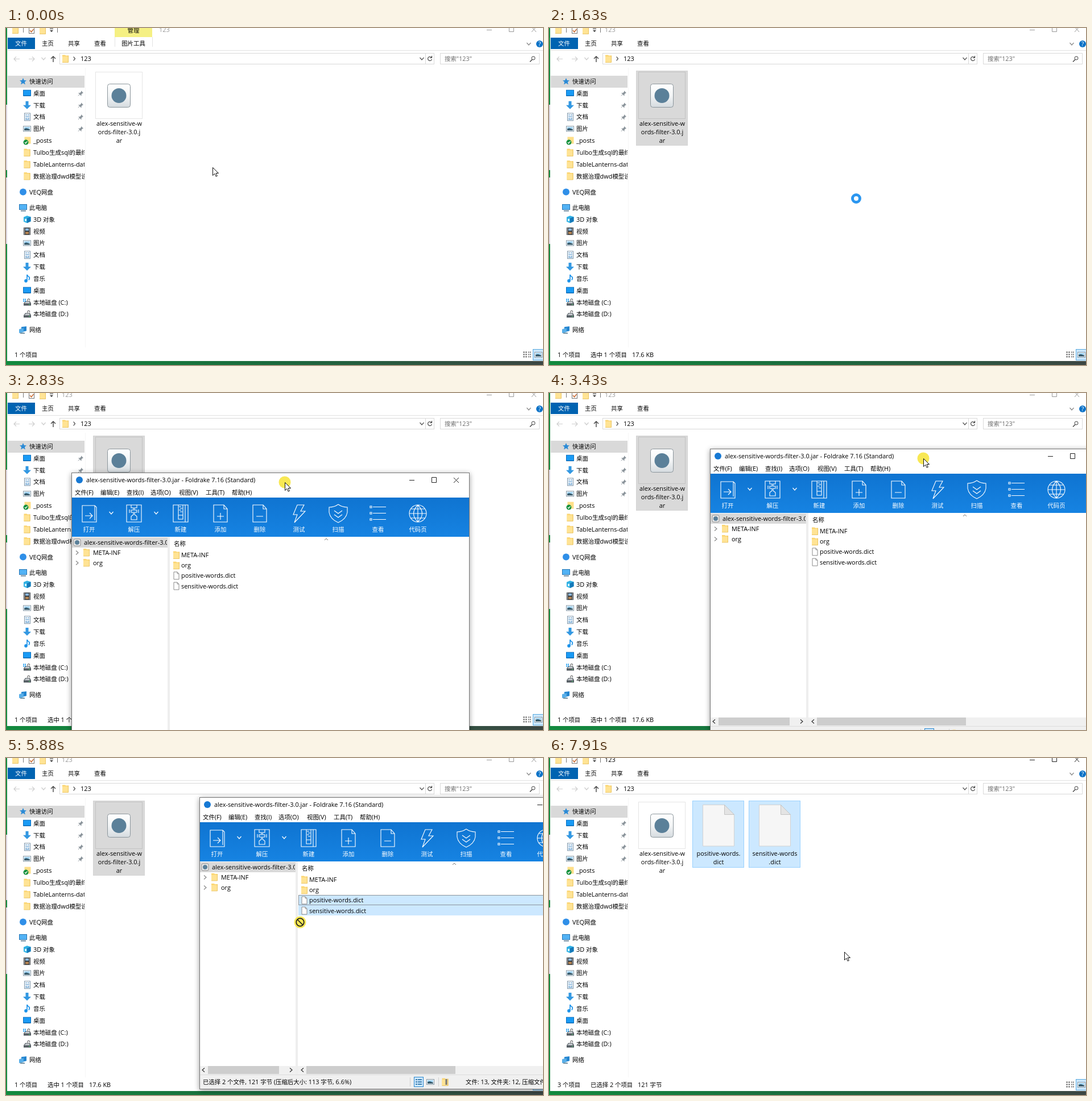
Write an HTML page that moves like this. It is 944 px wide and 593 px high and loops after 8000 ms.

```html
<!DOCTYPE html>
<html lang="zh-CN">
<head>
<meta charset="utf-8">
<title>123</title>
<style>
  html, body { margin: 0; width: 100%; height: 100%; overflow: hidden; background: #fff; }
  svg { display: block; width: 944px; height: 593px; }
  text { font: 10.9px "Open Sans", "Noto Sans CJK SC", "Noto Sans CJK", sans-serif; white-space: pre; }
  tspan { font-size: 10.4px; }
  .mid { text-anchor: middle; }
  .row > rect { fill: none; }
  .row.on > rect { fill: #0a8ceb; }
  .row.on > text { fill: #fff; }
  #caption { fill: #999; stroke: #999; }
  #caption.active { fill: #000; stroke: #222; }
  #caption text { stroke: none; }
  #archive { filter: drop-shadow(0 2px 5px #0006); }
</style>
</head>
<body>
<svg id="stage" viewBox="0 0 944 593"></svg>
<script>
const LOOP = 8000;
const BLUE = '#1a8ae2';

// Drawing helpers
const text = (x, y, s, attr = '') =>
  `<text x="${x}" y="${y + 4}" ${attr}>${s.replace(/[\u3000-\u9fff]+/g, '<tspan>$&</tspan>')}</text>`;
const rect = (x, y, w, h, fill, attr = '') =>
  `<rect x="${x}" y="${y}" width="${w}" height="${h}" fill="${fill}" ${attr}/>`;
const box = (x, y, w, h, fill, stroke, attr = '') =>
  rect(x + .5, y + .5, w - 1, h - 1, fill, `stroke="${stroke}" ${attr}`);
const line = (d, stroke = '#444', width = 1, fill = 'none') =>
  `<path d="${d}" stroke="${stroke}" stroke-width="${width}" fill="${fill}"/>`;
const shape = (d, fill) => `<path d="${d}" fill="${fill}"/>`;
const dot = (x, y, r, fill) => `<circle cx="${x}" cy="${y}" r="${r}" fill="${fill}"/>`;
const at = (x, y, body) => `<g transform="translate(${x} ${y})">${body}</g>`;
const group = (id, body) => `<g id="${id}">${body}</g>`;
const chevron = (x, y, color = '#555') => line(`M${x - 3.5} ${y - 2}l3.5 4 3.5 -4`, color, 1.2);
const angle = (x, y, dir, color = '#333') => line(`M${x - dir * 2} ${y - 3.5}l${dir * 4} 3.5 ${-dir * 4} 3.5`, color, 1.2);

// Icons, each centred on 0,0
const icons = {
  none: '',
  folder: shape('M-5.5 -6.5h5l1 1h5v12h-11z', '#fbd572') + shape('M-5.5 -4h9l2 1v9.5h-11z', '#ffe394') + line('M5 -5.5v12h-10.5', '#e3b84e', .7),
  file: line('M-4.5 -6.5h6l3 3v10h-9z', '#8a8a8a', 1, '#fff') + line('M1.5 -6.5v3h3', '#8a8a8a'),
  star: shape('M0 -6l1.8 4 4.2 .3-3.2 2.8 1 4.3-3.8-2.3-3.8 2.3 1-4.3-3.2-2.8 4.2-.3z', '#2c8bd6'),
  desktop: box(-7, -6, 14, 11, '#1a9bf5', '#0a6fc0') + rect(-6, 4, 12, 1, '#0d5fa5'),
  down: shape('M-2.5 -7h5v7h4.500l-7 7-7-7h4.500z', '#3398e2'),
  doc: box(-5, -7, 11, 14, '#fff', '#7a93a8') + line('M-3 -3.500h3m1 0h3M-3 -.5h7M-3 2.500h3m1 0h3M-3 4.500h7', '#3d86c4'),
  picture: box(-7, -5, 14, 10, '#fff', '#8296a5') + rect(-5, -3, 10, 3, '#9bd1f2') + shape('M-5 3v-3l4-1 6 2v2z', '#35596b'),
  checked: shape('M-4.500 -6.500h11v12h-11z', '#ffdf88') + dot(-2, 3, 4.500, '#16913d') + line('M-4 3l1.500 1.800 3-3.600', '#fff', 1.3),
  cloud: dot(0, 0, 6, '#2f8fe8'),
  pc: box(-7, -6, 14, 10, '#53b3f5', '#2676b5') + rect(-4, 5, 9, 1.500, '#50748d'),
  cube: shape('M-6 -4l6-2.500 6.500 2v8l-6.500 3-6-2.500z', '#30b1e4') + shape('M0 -2l6.500 -2.500v8l-6.500 3z', '#1679b9') + shape('M-4 -1h3v4h-3z', '#d8f3ff'),
  film: rect(-6, -6.500, 12, 13, '#2d3338') + rect(-3, -5, 6, 4, '#8ebbe0') + rect(-3, 1, 6, 4, '#b88653') + line('M-4.500 -6v12M4.500 -6v12', '#ccc', 1),
  music: dot(-2, 4, 2.800, '#1d93ea') + line('M0 4v-11q1 3 4 4.500 1 2-1 5', '#1d93ea', 1.700),
  disk: shape('M-6 2l3-4h8l2 4v4h-13z', '#555d63') + shape('M-5 2l3-3h6l1 3z', '#c9ced1') + line('M1 -2v-3q2-2 3.500 0v2', '#777', 1.200) + rect(3, 3.500, 2, 1, '#53df72'),
  system: '',
  network: shape('M-3 -5l9-1v8l-9 2z', '#2485cf') + shape('M-7 -1l8-2v7l-8 2z', '#58aee8') + line('M-5 6h8', '#477089', 1.500),
  app: dot(0, 0, 6, '#1779d4'),
  editor: rect(-6, -6, 12, 12, '#a9c55c'),
  guard: dot(0, 0, 6, '#f29b26'),
  share: line('M-1 -4h-5v9h10v-3M-3 2q0-5 6-5v-3l4 4-4 4v-3q-4 0-6 3', '#333'),
  version: rect(-6, -6, 12, 12, '#8495a8'),
  tile: box(-6.500, -6.500, 13, 13, '#eee', '#8b8b8b', 'rx="2"') + dot(0, 0, 4, '#5b8099')
};
icons.system = icons.disk + [-7, -4].map(x => rect(x, -6, 2, 2, '#1899ef') + rect(x, -3, 2, 2, '#1899ef')).join('');
const icon = (name, x, y) => at(x, y, icons[name]);

// File manager
const sidebar = () => {
  const item = (y, name, label, head) =>
    icon(name, head ? 30 : 37, y) + text(head ? 41 : 48, y, label);
  const quick = [['star', '快速访问'], ['desktop', '桌面'], ['down', '下载'], ['doc', '文档'], ['picture', '图片'],
    ['checked', '_posts'], ['folder', 'Tulbo生成sql的最终版'], ['folder', 'TableLanterns-data'], ['folder', '数据治理dwd模型设计']];
  const places = [['pc', '此电脑'], ['cube', '3D 对象'], ['film', '视频'], ['picture', '图片'], ['doc', '文档'],
    ['down', '下载'], ['music', '音乐'], ['desktop', '桌面'], ['system', '本地磁盘 (C:)'], ['disk', '本地磁盘 (D:)']];
  const list = (rows, y) => rows.map(([name, label], i) => item(y + i * 20.82, name, label, !i)).join('');
  const pins = [1, 2, 3, 4].map(i => at(131, 94.500 + i * 20.82,
    shape('M1 -5l4 4-1.500 .5-2 2 0 3-5.500-5.500 3 0 2-2z', '#8b949b') + line('M-1 1l-3 3', '#8b949b'))).join('');
  return rect(3, 84, 135, 21, '#d9d9d9') + `<g clip-path="url(#side)">` + list(quick, 94) + pins +
    item(288.500, 'cloud', 'VEQ网盘', true) + list(places, 316) + item(531, 'network', '网络', true) +
    '</g>' + rect(139, 70, 1, 492, '#f5f5f5');
};

const label = (x, lines) => lines.map((s, i) => text(x, 168 + i * 14.800, s, 'class="mid"')).join('');
const sheet = (x, lines) => box(x, 75, 91, 118, '#cce8ff', '#99d1ff') +
  line(`M${x + 18.500} 82.500h38l17 17v55.500h-55z`, '#d2d2d2', 1, '#f6f6f6') +
  line(`M${x + 56.500} 82.500v17h17z`, '#c4c4c4', 1, '#e4e4e4') + label(x + 46, lines);

const explorer = () =>
  rect(0, 0, 944, 593, '#128a3e') + rect(0, 135, 2, 115, '#d9d4de') + rect(0, 263, 2, 117, '#d9d4de') +
  rect(0, 585, 944, 8, 'url(#desk)') + rect(2, 0, 942, 586, '#fff') +
  icon('folder', 16.500, 3) + line('M30.500 0v8M90.500 0v8', '#777') +
  box(40, -1, 10, 11, '#fff', '#777') + line('M42 4l2.500 3 4-5', '#c96c33', 1.500) + icon('folder', 64.500, 4) +
  line('M77 1.500h6', '#333') + shape('M77 4h6l-3 3z', '#333') +
  group('tools', rect(191, 0, 66, 16, '#f5f083') + line('M191.500 16v17M257.500 16v17', '#e3e3e3') +
    text(224, 4, '管理', 'class="mid"') + text(224, 27, '图片工具', 'class="mid"')) +
  group('caption', text(0, 3, '123', 'id="title"') +
    '<path fill="none" d="M845 3.500h9M884.500 -2.500h8v9h-8zM924 -2l8 9M932 -2l-8 9"/>') +
  rect(3, 17, 48, 20, '#0063b1') + text(16, 27, '文件', 'fill="#fff"') +
  text(63, 27, '主页') + text(109, 27, '共享') + text(155, 27, '查看') + rect(3, 39, 941, 1, '#e1e1e1') +
  chevron(919, 28, '#888') + dot(938, 28, 6, '#0a72c7') + text(938, 28, '?', 'class="mid" fill="#fff" font-weight="bold"') +
  line('M24 54.500h-10m4-4l-4 4 4 4M40 54.500h10m-4-4l4 4-4 4', '#cfcfcf', 1.200) + chevron(66, 54, '#ccc') +
  line('M83 60v-10m-4 4l4-4 4 4', '#444', 1.400) +
  box(94, 44, 659, 20, '#fff', '#d9d9d9') + line('M737.500 45v18', '#d9d9d9') +
  icon('folder', 104.500, 54) + angle(120, 54, .700) + text(131, 54, '123') + chevron(731, 54) +
  line('M748 52a3.500 3.500 0 1 0 .5 3M748.500 49v3.500h-3.500', '#444', 1.200) +
  box(763, 44, 175, 20, '#fff', '#d9d9d9') + text(771, 54, '搜索"123"', 'fill="#6d6d6d"') +
  '<circle cx="927" cy="53" r="3" fill="none" stroke="#444"/>' + line('M925 55.500l-4 4', '#444', 1.500) +
  sidebar() +
  `<rect id="pick" x="153.500" y="75.500" width="90" height="131"/>` +
  box(157, 77, 83, 83, 'none', '#000', 'stroke-opacity=".1"') +
  box(178, 98, 41, 42, 'url(#tile)', '#8c969c', 'rx="4"') + dot(198.500, 119, 13, '#5b8099') +
  label(199, ['alex-sensitive-w', 'ords-filter-3.0.j', 'ar']) +
  group('extracted', sheet(252, ['positive-words.', 'dict']) + sheet(351, ['sensitive-words', '.dict'])) +
  text(15, 575, '', 'id="count"') + text(73, 575, '', 'id="chosen"') + text(146, 575, '', 'id="size"') +
  [570, 574, 578].map(y => line(`M909 ${y + .5}h3m1 0h3m2 0h2m1 0h2`, '#777', 2)).join('') +
  box(926, 565, 20, 20, '#cce8ff', '#58a9de') + icon('picture', 936, 575);

// Context menu: [y, icon, icon x, text x, label, has submenu]
const menuRows = [
  [112, 'none', 0, 234, '打开(O)'], [130, 'none', 0, 234, 'VEQ云文档 - 分享文件'],
  [156, 'app', 224, 234, '解压到当前文件夹(E)'], [174, 'app', 224, 234, '自动解压(S)'],
  [192, 'app', 224, 234, '解压到 alex-sensitive-words-fil...\\(T)'], [210.500, 'app', 224, 234, '选择解压路径...'],
  [239, 'app', 224, 232, '压缩文件预览'], [257, 'folder', 233, 242, 'META-INF'], [275, 'folder', 247, 256, 'maven'],
  [293, 'file', 247, 256, 'MANIFEST.MF'], [312, 'folder', 233, 242, 'org'],
  [330, 'file', 233, 242, 'positive-words.dict'], [348, 'file', 233, 242, 'sensitive-words.dict'],
  [378, 'editor', 224, 234, 'Edit with Notepad++'], [396, 'guard', 224, 234, '使用竹影安全进行杀毒'],
  [414, 'share', 224, 234, '共享'], [433, 'none', 0, 234, '打开方式(H)...'], [458, 'none', 0, 234, '上传到VEQ云文档'],
  [484, 'none', 0, 234, '授予访问权限(G)', true], [510, 'version', 225, 234, 'TortoiseGit(T)', true],
  [536, 'version', 225, 234, 'TortoiseSVN', true], [562.500, 'none', 0, 234, '还原以前的版本(V)'],
  [588, 'none', 0, 234, '发送到(N)', true]
];
const menu = () =>
  rect(217, 104, 236, 500, '#000', 'opacity=".42"') + box(213, 100, 237, 500, '#f2f2f2', '#a0a0a0') +
  [142, 223, 364, 445, 471, 497, 523, 549, 575].map(y => rect(217, y, 229, 1, '#a6a6a6')).join('') +
  menuRows.map(([y, name, ix, x, s, sub], i) =>
    `<g class="row">${rect(216, y - 9, 231, 18, 'none')}${icon(name, ix, y)}` +
    text(x, y, s, i ? '' : 'style="font-weight:bold"') + (sub ? shape(`M437 ${y - 4}l4 3.500-4 3.500z`, '#000') : '') + '</g>').join('');

// Archive window, in its own coordinates
const toolIcons = [
  [31, '打开', 'M-12 -14h22l3 3v26h-25zM10 -14v26M-7 4h13m-5-5l5 5-5 5'],
  [110, '解压', 'M-13 -15h26v30h-26zM-5 -15v5h4v4h-4v4h4v4l-4 3v6h10v-6l-4-3v-4h4v-4h-4v-4h4v-5M-8 -7v6M8 -7v6'],
  [192, '新建', 'M-13 -15h26v30h-26zM-4 -15v18h8v-18M-3 -12h4m-2 3h4m-6 3h4m-2 3h4M-4 3v7h8v-7M8 -15v30'],
  [262, '添加', 'M-12 -15h18l6 7v23h-24zM6 -15v7h6M-6 5h12m-6-6v12'],
  [331, '删除', 'M-12 -15h18l6 7v23h-24zM6 -15v7h6M-6 5h12'],
  [400, '测试', 'M-3 -15h12l-6 11h8l-19 20 5-14h-7z'],
  [469, '扫描', 'M0 -16q7 5 16 5v9q-2 12-16 18q-14-6-16-18v-9q9 0 16-5M-7 -5l7 5 7-5M-7 2l7 5 7-5'],
  [539, '查看', 'M-9 -11.500h23M-9 -.5h23M-9 10.500h23M-14 -13h3v3h-3zM-14 -2h3v3h-3zM-14 9h3v3h-3z'],
  [609, '代码页', 'M-15 0a15 15 0 1 0 30 0a15 15 0 1 0-30 0h30M0 -15v30M0 -15q-15 15 0 30q15-15 0-30M-12 -8h24M-12 8h24']
];
const bars = [['文件(F)', 6], ['编辑(E)', 51], ['查找(I)', 97], ['选项(O)', 139], ['视图(V)', 189], ['工具(T)', 236], ['帮助(H)', 282]];
const archive = () =>
  box(0, 0, 700, 514, '#fff', '#777') + icon('app', 14, 13) +
  text(26, 13, 'alex-sensitive-words-filter-3.0.jar - Foldrake 7.16 (Standard)') +
  line('M594 13.500h9M633.500 8.500h8v9h-8zM672 9l9 9M681 9l-9 9', '#222') +
  bars.map(([s, x]) => text(x, 35, s)).join('') +
  rect(1, 44, 698, 69, 'url(#ribbon)') +
  toolIcons.map(([x, s, d]) => at(x, 72, line(d, '#fff', 1.100)) + text(x, 100, s, 'class="mid" fill="#fff"')).join('') +
  chevron(70, 71, '#fff') + chevron(149, 71, '#fff') +
  rect(1, 114, 168, 18, '#d9d9d9') + icon('tile', 10, 123) +
  `<g clip-path="url(#tree)">${text(22, 123, 'alex-sensitive-words-filter-3.0.jar')}</g>` +
  ['META-INF', 'org'].map((s, i) => angle(10, 141 + i * 18, 1, '#888') + icon('folder', 26.500, 140.500 + i * 18) + text(38, 140.500 + i * 18, s)).join('') +
  rect(169, 113, 4, 375, '#eee') + text(180, 125, '名称') + line('M445 119l3-3 3 3', '#777') +
  `<rect id="rowA" x="174.500" y="172.500" width="525" height="17" fill="#cce8ff"/>` +
  rect(174, 190, 525, 18, '#cce8ff', 'id="rowB"') +
  ['META-INF', 'org', 'positive-words.dict', 'sensitive-words.dict'].map((s, i) =>
    icon(i < 2 ? 'folder' : 'file', 184.500, 145 + i * 18.200) + text(193, 145 + i * 18.200, s)).join('') +
  rect(1, 473, 168, 15, '#f0f0f0') + rect(15, 473, 125, 14, '#cdcdcd') + angle(7, 480, -1) + angle(161, 480, 1) +
  rect(173, 473, 526, 15, '#f0f0f0') + rect(188, 473, 262, 14, '#cdcdcd') + angle(181, 480, -1) +
  rect(1, 488, 698, 25, '#f0f0f0') + rect(1, 488, 698, 1, '#ddd') + text(6, 501, '', 'id="summary"') +
  line('M370.500 493v16M420.500 493v16', '#d0d0d0') +
  box(377, 492, 17, 18, '#cce8ff', '#2a86cc') +
  [497, 501, 505].map(y => line(`M380 ${y}h3m1 0h7`, '#3f7fae', 2)).join('') +
  icon('picture', 406, 501) + icon('folder', 432, 501) + line('M434 496v10', '#777', 3) +
  text(468, 501, '文件: 13, 文件夹: 12, 压缩文件大小: 17.6 KB');

const gradient = (id, dir, stops) => `<linearGradient id="${id}" ${dir}>` +
  stops.map((c, i) => `<stop offset="${i / (stops.length - 1)}" stop-color="${c}"/>`).join('') + '</linearGradient>';
const stage = document.getElementById('stage');
stage.innerHTML = '<defs>' +
  gradient('desk', '', ['#128a3e', '#1b6a3e', '#3c4643']) +
  gradient('tile', 'x2="0" y2="1"', ['#fff', '#f3f5f6', '#d5dbdf']) +
  gradient('ribbon', 'x2="0" y2="1"', ['#0f74d1', '#1683e2']) +
  `<clipPath id="side">${rect(0, 60, 138, 510, '#000')}</clipPath><clipPath id="tree">${rect(0, 110, 168, 30, '#000')}</clipPath></defs>` +
  explorer() + group('menu', menu()) + group('archive', archive()) +
  '<rect id="marquee" fill="#06c" fill-opacity=".28" stroke="#0078d7"/>' +
  group('pointer', group('press', dot(0, 0, 10.500, '#f7e436').replace('/>', ' opacity=".85"/>')) +
    group('arrow', line('M.5 .5v14l3.300-3.200 2.300 5 2.200-1-2.200-4.800h4.400z', '#111', 1, '#fff')) +
    group('busy', '<circle r="6.500" fill="#fff" stroke="#2a96f0" stroke-width="5"/>') +
    group('deny', '<circle r="6.800" fill="none" stroke="#222" stroke-width="1.700"/>' + line('M-4.500 -4.500l9 9', '#222', 1.700)));

const ticks = [0, 200, 400, 600, 800, 1000, 1190, 1630, 1820, 2010, 2220, 2430, 2650, 2830, 3020, 3230, 3430, 3650, 3850,
  4050, 4250, 4450, 4670, 4870, 5060, 5260, 5460, 5670, 5880, 6070, 6280, 6480, 6680, 6890, 7090, 7300, 7500, 7700, 7910];
const path = [[0, 363, 245], [400, 213, 100], [600, 213, 100], [800, 267, 190], [1190, 290, 325], [1630, 540, 300],
  [2010, 651, 283], [2220, 640, 270], [2830, 490, 157], [3430, 658, 115], [3850, 715, 86], [4450, 671, 353],
  [4670, 610, 268], [4870, 590, 246], [5260, 575, 251], [5880, 517, 289], [6280, 291, 352], [6680, 291, 352],
  [7500, 552, 185], [7910, 519, 341]];

const pointerAt = t => {
  const i = path.findLastIndex(p => p[0] <= t);
  const [t0, x0, y0] = path[i], [t1, x1, y1] = path[i + 1] || [LOOP, x0, y0];
  const k = (t - t0) / (t1 - t0);
  return [x0 + (x1 - x0) * k, y0 + (y1 - y0) * k];
};
const $ = id => document.getElementById(id);
const show = (id, on) => $(id).style.display = on ? '' : 'none';
const attrs = (id, values) => Object.entries(values).forEach(([k, v]) => $(id).setAttribute(k, v));
const write = (id, s) => $(id).innerHTML = s.replace(/[\u3000-\u9fff]+/g, '<tspan>$&</tspan>');
const rows = [...document.querySelectorAll('.row')];

function draw(t) {
  const within = (a, b) => t >= a && t < b;
  const [x, y] = pointerAt(t);
  const done = t >= 6890, active = within(400, 1630) || done;

  show('tools', t < 400);
  $('caption').classList.toggle('active', active);
  attrs('title', { x: t < 400 ? 269 : 98 });
  show('pick', within(400, 6890));
  attrs('pick', active ? { fill: '#cce8ff', stroke: '#99d1ff' } : { fill: '#d9d9d9', stroke: '#d4d4d4' });
  show('extracted', done);
  write('count', done ? '3 个项目' : '1 个项目');
  write('chosen', t < 400 ? '' : done ? '已选择 2 个项目' : '选中 1 个项目');
  write('size', t < 400 ? '' : done ? '121 字节' : '17.6 KB');
  attrs('size', { x: done ? 156 : 146 });

  show('menu', within(600, 1630));
  rows.forEach((row, i) => row.classList.toggle('on', x > 216 && Math.abs(menuRows[i][0] - y) < 9));

  show('archive', within(2430, 6890));
  const [hx, hy] = pointerAt(Math.min(Math.max(t, 2830), 3850));
  attrs('archive', { transform: `translate(${Math.round(hx - 375)} ${Math.round(hy - 17)})` });
  show('rowA', t >= 4870);
  show('rowB', t >= 4670);
  attrs('rowA', t >= 5260 ? { stroke: '#333', 'stroke-dasharray': '1 1' } : { stroke: 'none' });
  write('summary', t < 4670 ? '' : t < 4870 ? '已选择 1 个文件, 86 字节 (压缩后大小: 84 字节, 2.3%)'
    : '已选择 2 个文件, 121 字节 (压缩后大小: 113 字节, 6.6%)');

  show('marquee', within(4670, 5060));
  attrs('marquee', { x: x + .5, y: y + .5, width: Math.max(0, 670 - x), height: Math.max(0, 353 - y) });

  const busy = within(1630, 2430), deny = within(5670, 6280);
  attrs('pointer', { transform: `translate(${Math.round(x)} ${Math.round(y)})` });
  show('press', within(2830, 3850) || within(4450, 5060) || within(5260, 6680));
  show('busy', busy);
  show('deny', deny);
  show('arrow', !busy && !deny);
}

const start = performance.now();
let shown;
function play() {
  const t = (performance.now() - start) % LOOP;
  const tick = ticks.findLast(v => v <= t);
  if (tick !== shown) draw(shown = tick);
  requestAnimationFrame(play);
}
play();
</script>
</body>
</html>
```
